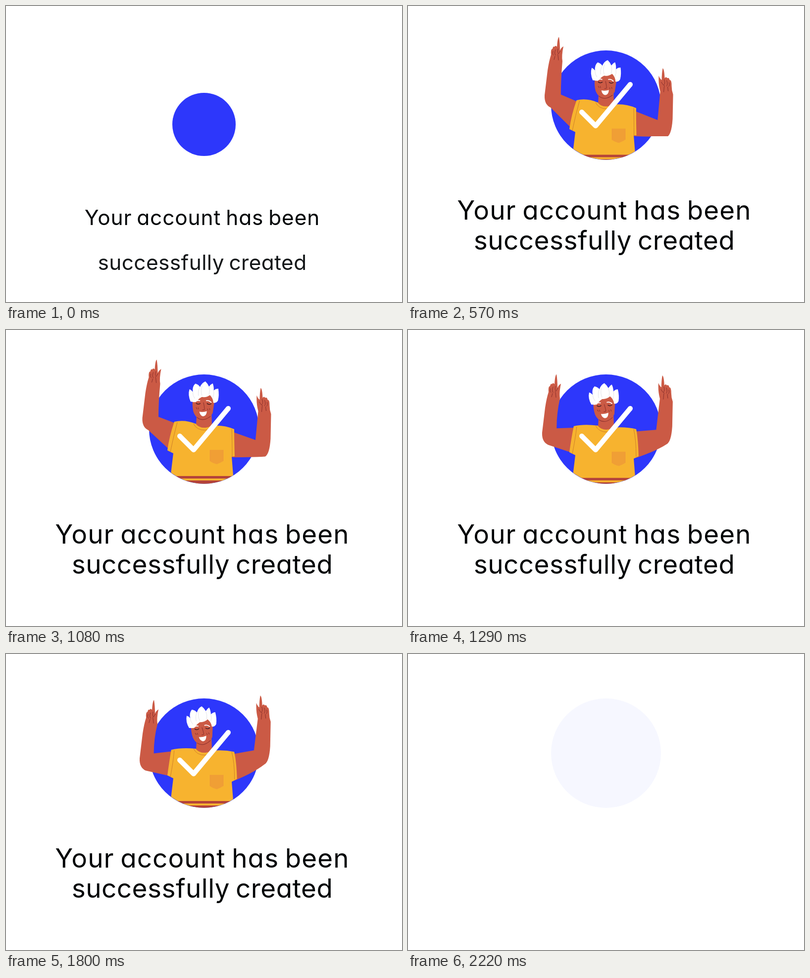
These frames come from a looping animation (800x600 px, 2.55 s). An HTML page:

```html
<!DOCTYPE html>
<html lang="en">
<head>
<meta charset="utf-8">
<title>Account created</title>
<style>
  html, body { margin: 0; width: 100%; height: 100%; overflow: hidden; background: #fff; }
  svg { display: block; width: 100%; height: 100%; }
  text {
    font: 400 53px Inter, "Open Sans", sans-serif;
    font-feature-settings: "cv11";
    font-optical-sizing: none;
    letter-spacing: 1.1px;
    word-spacing: -3.5px;
    text-anchor: middle;
    fill: #010406;
  }
  #line2 { letter-spacing: .5px; }
  .skin { fill: #cb5a45; }
  .shirt { fill: #f7b32f; }
  .line { fill: none; stroke: #8a2f2c; stroke-width: 1; stroke-linecap: round; }
  .seam { fill: none; stroke: #d0802a; stroke-width: 1; }
  .band { fill: #b4433a; }
  .white { fill: #fff; }
</style>
</head>
<body>
<svg viewBox="0 0 800 600">
  <defs>
    <clipPath id="window">
      <circle cx="400" cy="201" r="110.5"/>
      <rect id="above" x="200" width="400"/>
    </clipPath>
    <pattern id="hatch" width="2" height="2" patternUnits="userSpaceOnUse">
      <rect width="2" height="2" fill="#f7b32f"/>
      <rect width="1" height="2" fill="#e98a3c"/>
    </pattern>
  </defs>

  <circle id="disc" cx="400" fill="#2d37fb"/>

  <g clip-path="url(#window)">
    <g id="figure">
      <path id="armL" class="skin"/>
      <path id="armR" class="skin"/>
      <g id="linesL" class="line">
        <path d="M289 99Q287 105 290 107M294 96Q291 103 294 107M299 94Q297 102 300 104M304 98Q301 104 298 106M293 109L291 116M299 107L300 117"/>
      </g>
      <g id="linesR" class="line">
        <path d="M527 114Q529 120 526 122M522 110Q525 117 522 121M517 108Q520 116 516 119M511 113Q514 119 518 121M524 123L525 131M517 122L516 133"/>
      </g>
      <path id="shirt" class="shirt"/>
      <path class="skin" d="M386 150L384 181Q391 189 403 188Q412 187 416 183L415 150Z"/>
      <path class="seam" d="M379 180Q385 193 402 193Q413 192 420 184"/>
      <path id="seams" class="seam"/>
      <path d="M411 233H440V255Q434 259 426 262Q417 260 411 255Z" fill="url(#hatch)"/>
      <path class="band" d="M325 286H465V291H325ZM325 295H465V304H325Z"/>
      <g id="head">
        <path class="skin" d="M375 128Q374 145 378 157Q384 171 397 172Q411 170 417 157L420 122L400 112Z"/>
        <path class="line" d="M386 168Q398 177 413 164"/>
        <path class="white" d="M371 137Q364 124 367 112Q371 113 374 117Q372 106 378 100Q384 101 388 106Q391 97 398 94Q403 98 406 104Q409 99 413 97Q416 103 416 111Q420 107 425 107Q428 120 426 131Q423 137 417 136Q416 127 409 121Q402 127 393 126Q388 129 385 133Q381 139 374 137Z"/>
        <path d="M374 117Q374 124 379 130M388 106Q384 113 386 124M406 104Q409 112 407 121M416 111Q418 119 415 126M392 104Q389 113 393 123" fill="none" stroke="#dedde3" stroke-width=".8"/>
        <path d="M380 137Q384 132 390 134M402 133Q408 131 413 136" fill="none" stroke="#fff" stroke-width="1.8"/>
        <path d="M382 139Q386 143 391 139M404 138Q408 142 413 138" fill="none" stroke="#401b22" stroke-width="1.5"/>
        <path class="line" d="M397 137Q400 147 400 151L396 152M383 148L385 151M387 148L388 151M406 149L407 152M410 148L411 151"/>
        <path class="white" d="M390 156Q398 157 405 154Q405 164 398 165Q392 164 390 156Z"/>
      </g>
    </g>
  </g>

  <g id="check" fill="#fff">
    <path id="tick" fill="none" stroke="#fff" stroke-width="10" stroke-linejoin="round"/>
    <circle id="tail" r="5"/>
    <circle id="tip" r="5"/>
  </g>

  <text id="line1">Your account has been</text>
  <text id="line2">successfully created</text>
</svg>
<script>
const LOOP = 2550, STEP = 30;
const $ = id => document.getElementById(id);
const set = (id, attrs) => {
  for (const k in attrs) $(id).setAttribute(k, attrs[k]);
};

// Linear interpolation through [time, value] keys
function at(t, keys) {
  if (t <= keys[0][0]) return keys[0][1];
  for (let i = 1; i < keys.length; i++) {
    const [t0, a] = keys[i - 1], [t1, b] = keys[i];
    if (t < t1) return a + (b - a) * (t - t0) / (t1 - t0);
  }
  return keys[keys.length - 1][1];
}

const RADIUS = [[0, 64], [60, 90], [120, 109], [180, 118], [225, 119], [300, 115.5], [360, 112.5], [450, 111]];
const CENTER = [[0, 240], [60, 224], [120, 211], [180, 204], [240, 201]];
const DISC_FADE = [[2040, 1], [2220, .04]];
const RISE = [[240, 270], [360, 172], [420, 90], [480, 38], [540, 8], [600, -7], [690, -14],
  [780, -15], [900, -12], [1080, -5], [1300, -1], [1500, 0], [1800, -3], [1980, -3],
  [2040, 10], [2100, 70], [2160, 200], [2190, 270]];
const TICK_END = [[210, 0], [360, 118], [400, 149]];
const TICK_START = [[1860, 0], [1970, 39.6], [1980, 39.6], [2130, 149]];

const [A, B, C] = [[351, 215], [379, 243], [449, 159]];
const SHORT = Math.hypot(28, 28), LONG = Math.hypot(70, 84);
const mix = (p, q, k) => p.map((v, i) => v + (q[i] - v) * k);
const along = d => d < SHORT ? mix(A, B, d / SHORT) : mix(B, C, Math.min(1, (d - SHORT) / LONG));

function drawCheck(t) {
  const end = at(t, TICK_END), start = at(t, TICK_START);
  const from = along(start), to = along(end);
  const bend = start < SHORT && end > SHORT ? "L" + B : "";
  set("check", { visibility: end > 0 && start < 148.9 ? "visible" : "hidden" });
  set("tick", { d: `M${from}${bend}L${to}` });
  set("tail", { cx: from[0], cy: from[1] });
  set("tip", { cx: to[0], cy: to[1], visibility: end >= 148.9 ? "inherit" : "hidden" });
}

function drawFigure(t) {
  const y = at(t, RISE);
  // Arms seesaw: s > 0 lifts the left one
  const s = 1.22 * Math.sin(2 * Math.PI * (t - 780) / 260);
  const mover = (dx, dy) => (px, py) => `${(px + dx * s).toFixed(2)} ${(py + dy * s).toFixed(2)}`;
  const l = mover(3.5, -20), r = mover(.5, 22.5);
  const crookL = mover(6, -15), crookR = mover(2, 19);
  const sl = mover(4, -4), sr = mover(0, 3), hem = mover(-3, 3);

  set("figure", { transform: `translate(0 ${y + 15})`, visibility: t < 240 || t >= 2190 ? "hidden" : "visible" });
  set("above", { height: Math.max(0, 264 - .14 * Math.max(0, y)) });
  set("armL", { d: `M${sl(338, 183)}L${crookL(302, 181)}Q${crookL(302, 150)} ${l(308, 119)}
    Q${l(306, 108)} ${l(310, 89)}Q${l(304, 93)} ${l(303, 98)}Q${l(303, 82)} ${l(301, 70)}
    Q${l(298, 72)} ${l(297, 90)}Q${l(294, 86)} ${l(292, 90)}Q${l(289, 88)} ${l(288, 94)}
    Q${l(284, 94)} ${l(285, 106)}Q${l(281, 118)} ${l(278, 138)}L${l(272, 188)}
    Q${l(271, 207)} ${l(284, 213)}L334 236Z` });
  set("armR", { d: `M${sr(456, 193)}L${crookR(502, 194)}L${r(509, 132)}
    Q${r(505, 117)} ${r(506, 100)}Q${r(508, 106)} ${r(512, 109)}Q${r(512, 95)} ${r(514, 85)}
    Q${r(517, 86)} ${r(518, 105)}Q${r(521, 101)} ${r(523, 105)}Q${r(527, 103)} ${r(528, 109)}
    Q${r(532, 108)} ${r(532, 121)}Q${r(532, 130)} ${r(535, 138)}L${r(534, 188)}
    Q${r(532, 219)} ${r(523, 224)}Q${mover(0, 13)(502, 235)} ${hem(463, 245)}L452 247Z` });
  set("shirt", { d: `M${sl(336, 180)}Q${sl(357, 175)} 383 180L417 184Q440 182 ${sr(461, 188)}
    Q${hem(464, 208)} ${hem(465, 243)}L456 247L461 310V420H320V310L332 290L338 240L326 234
    Q330 205 ${sl(336, 180)}Z` });
  set("seams", { d: `M${sl(342, 181)}Q338 207 332 237M${sr(456, 188)}Q${hem(460, 210)} ${hem(460, 244)}` });
  set("linesL", { transform: `translate(${3.5 * s} ${-20 * s})` });
  set("linesR", { transform: `translate(${.5 * s} ${22.5 * s})` });
  set("head", { transform: `rotate(${3.9 * s} 397 165)` });
}

function drawText(t) {
  const k = Math.pow(1 - Math.min(1, t / 300), 2.5);
  const place = (id, base, drop, opacity) => set(id, {
    transform: `translate(396.5 ${base + drop * k}) scale(${1 - .2 * k})`, opacity
  });
  place("line1", 433, 11, at(t, [[1894, 1], [2094, 0]]));
  place("line2", 494, 41, at(t, [[0, .92], [90, 1], [1838, 1], [2038, 0]]));
}

function draw(t) {
  set("disc", { r: at(t, RADIUS), cy: at(t, CENTER), opacity: at(t, DISC_FADE) });
  drawFigure(t);
  drawCheck(t);
  drawText(t);
}

const began = performance.now();
function tick() {
  const t = (performance.now() - began) % LOOP;
  draw(Math.floor(t / STEP) * STEP);
  requestAnimationFrame(tick);
}
tick();
</script>
</body>
</html>
```
